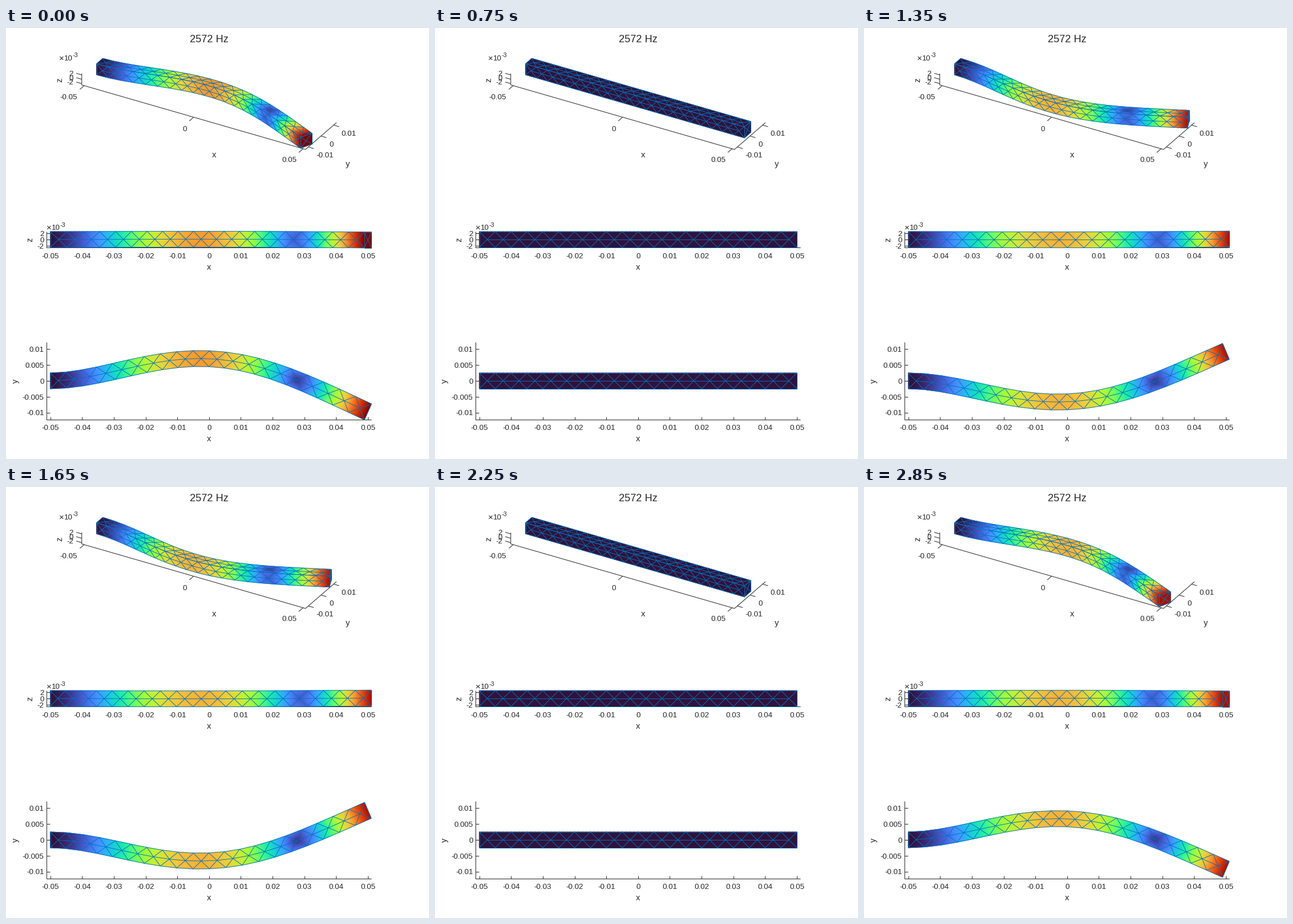
Recreate the animation shown at these times as a matplotlib script. Size 741 px wide and 756 px high, loop 3 s.

```python
import numpy as np
import matplotlib.pyplot as plt
from matplotlib.animation import FuncAnimation
from matplotlib.collections import LineCollection

W, H, DPI = 741, 756, 64
FRAMES, INTERVAL = 20, 150
PT = 72 / DPI                      # points per pixel

LENGTH, HALF, CELLS = 0.1, 0.0025, 20
AMP = 0.00977                      # tip deflection
XLIM, YLIM, ZLIM = 0.0511, 0.01225, 0.0026
INK, EDGE = "#262626", (0, 0.447, 0.741)

plt.rcParams["font.family"] = "Liberation Sans"
fig = plt.figure(figsize=(W / DPI, H / DPI), dpi=DPI, facecolor="white")
ax = fig.add_axes([0, 0, 1, 1])
ax.set_xlim(0, W)
ax.set_ylim(H, 0)
ax.axis("off")


# ---- projections: data (x, y, z) to pixels -------------------------------
class View:
    def __init__(self, origin, matrix):
        self.origin = np.array(origin)
        self.matrix = np.array(matrix)

    def __call__(self, pts):
        return self.origin + np.asarray(pts) @ self.matrix.T


def oblique(origin, scale, az, el):
    ca, sa, ce, se = np.cos(az), np.sin(az), np.cos(el), np.sin(el)
    return View(origin, scale * np.array([[ca, sa, 0],
                                          [sa * se, -ca * se, -ce]]))


S = 5565
iso = oblique((355.8, 123), 4428, np.pi / 6, np.pi / 6)
side = View((355.8, 371), [[S, 0, 0], [0, 0, -S]])
plan = View((355.8, 618.9), [[S, 0, 0], [0, -S, 0]])


# ---- beam surface mesh ---------------------------------------------------
def strip(place):
    """Long face: two edge rows and a staggered centre row of nodes."""
    n = CELLS
    xe = np.linspace(-LENGTH / 2, LENGTH / 2, n + 1)
    xc = (xe[:-1] + xe[1:]) / 2
    nodes = np.array([place(x, -HALF) for x in xe]
                     + [place(x, HALF) for x in xe]
                     + [place(x, 0) for x in xc])
    lo, hi, mid = 0, n + 1, 2 * n + 2
    tris = [(row + k, row + k + 1, mid + k) for row in (lo, hi) for k in range(n)]
    tris += [(mid + k, mid + k + 1, row + k + 1)
             for row in (lo, hi) for k in range(n - 1)]
    tris += [(lo, hi, mid), (lo + n, hi + n, mid + n - 1)]
    return nodes, np.array(tris)


def tip_face():
    x = LENGTH / 2
    ring = [(-HALF, -HALF), (HALF, -HALF), (HALF, HALF), (-HALF, HALF), (0, 0)]
    nodes = np.array([(x, y, z) for y, z in ring])
    return nodes, np.array([(k, (k + 1) % 4, 4) for k in range(4)])


front = strip(lambda x, t: (x, -HALF, t))
top = strip(lambda x, t: (x, t, HALF))
tip = tip_face()


def unique_edges(tris):
    pairs = np.vstack([tris[:, [0, 1]], tris[:, [1, 2]], tris[:, [2, 0]]])
    return np.unique(np.sort(pairs, axis=1), axis=0)


def subdivision(n):
    """Barycentric weights and small triangles inside one triangle."""
    keys = [(i, j) for i in range(n + 1) for j in range(n + 1 - i)]
    index = {key: k for k, key in enumerate(keys)}
    weights = np.array([(i, j, n - i - j) for i, j in keys]) / n
    small = []
    for i, j in keys:
        if i + j < n:
            small.append((index[i, j], index[i + 1, j], index[i, j + 1]))
        if i + j < n - 1:
            small.append((index[i + 1, j], index[i + 1, j + 1], index[i, j + 1]))
    return weights, np.array(small)


WEIGHTS, SMALL = subdivision(4)


# ---- second bending mode of a cantilever ---------------------------------
BETA = 4.694091
SIGMA = (np.sinh(BETA) - np.sin(BETA)) / (np.cosh(BETA) + np.cos(BETA))


def shape(s):
    b = BETA * s
    return np.cosh(b) - np.cos(b) - SIGMA * (np.sinh(b) - np.sin(b))


def slope(s):
    b = BETA * s
    return BETA * (np.sinh(b) + np.sin(b) - SIGMA * (np.cosh(b) - np.cos(b)))


def displacement(nodes):
    s = nodes[:, 0] / LENGTH + 0.5
    w = -AMP * shape(s) / shape(1)
    turn = -0.95 * AMP / LENGTH * slope(s) / shape(1)
    return np.column_stack([-nodes[:, 1] * turn, w, 0.015 * w])


VMAX = np.linalg.norm(displacement(tip[0]), axis=1).max()

# ---- static axes and text ------------------------------------------------


def line(*pts):
    x, y = zip(*pts)
    ax.plot(x, y, color=INK, lw=PT, zorder=1, solid_capstyle="butt")


def label(x, y, s, ha="center", size=13.33):
    ax.text(x, y + 0.345 * size, s, ha=ha, va="baseline",
            fontsize=size * PT, color=INK, zorder=5)


def name(x, y, s, rotation=0):
    ax.text(x, y, s, ha="center", va="center", rotation=rotation,
            fontsize=14.67 * PT, color=INK, zorder=5)


def exponent(x, y):
    label(x, y, "×", "left", 15)
    label(x + 9, y, "10", "left")
    label(x + 24, y - 4.5, "-3", "left", 10.7)


def tick(view, base, step, length):
    p = view(base)
    d = view.matrix @ np.array(step, float)
    line(p, p + d / np.hypot(*d) * length)


def flat_axes(view, low, bottom, ticks, up):
    """Axes with inward ticks; `up` places a value on the vertical axis."""
    x0, x1 = view([-XLIM, 0, 0])[0], view([XLIM, 0, 0])[0]
    y0, y1 = view(up(-low))[1], view(up(low))[1]
    line((x0, y1), (x0, y0), (x1, y0))
    for k in range(-5, 6):
        x = view([k / 100, 0, 0])[0]
        line((x, y0), (x, y0 - 5.5))
        label(x, bottom, f"{k / 100:g}")
    for value, text in ticks:
        y = view(up(value))[1]
        line((x0, y), (x0 + 5.5, y))
        label(66.5, y + 0.3, text, "right")
    name(356, bottom + 20, "x")


Z_TICKS = [(0.002, "2"), (0, "0"), (-0.002, "-2")]
flat_axes(side, ZLIM, 399.5, Z_TICKS, lambda v: [0, 0, v])
flat_axes(plan, YLIM, 700.8,
          [(v, f"{v:g}") for v in (0.01, 0.005, 0, -0.005, -0.01)],
          lambda v: [0, v, 0])
name(42.5, 371, "z", 90)
name(17, 619, "y", 90)
exponent(71, 349.5)

line(*iso([(-XLIM, -YLIM, ZLIM), (-XLIM, -YLIM, -ZLIM),
           (XLIM, -YLIM, -ZLIM), (XLIM, YLIM, -ZLIM)]))
for v, x, y in [(-0.05, 109.5, 120.5), (0, 313, 176), (0.05, 496, 230.5)]:
    tick(iso, (v, -YLIM, -ZLIM), (0, -1, 0), 10)
    label(x, y, f"{v:g}")
for v, x, y in [(0.01, 601, 184), (0, 570, 203), (-0.01, 559, 222.5)]:
    tick(iso, (XLIM, v, -ZLIM), (1, 0, 0), 10)
    label(x, y, f"{v:g}")
for v, text in Z_TICKS:
    base = (-XLIM, -YLIM, v)
    tick(iso, base, (-1, 0, 0), 10)
    label(118, iso(base)[1] - 3, text, "right")
name(364.5, 223, "x")
name(599, 239, "y")
name(94, 91, "z", 90)
exponent(93, 52)
label(355.5, 18.5, "2572 Hz", size=18.2)

# ---- animated beam -------------------------------------------------------
wires = LineCollection([], colors=[EDGE], linewidths=0.95 * PT, zorder=4)
ax.add_collection(wires)
surfaces = []


def faces_camera(p):
    a, b = p[1] - p[0], p[3] - p[0]
    return a[0] * b[1] - a[1] * b[0] < -1


def paint(p, value, tris):
    fine = np.einsum("wk,tkd->twd", WEIGHTS, p[tris]).reshape(-1, 2)
    shade = (value[tris] @ WEIGHTS.T).ravel()
    offsets = np.arange(len(tris))[:, None, None] * len(WEIGHTS)
    small = (SMALL[None] + offsets).reshape(-1, 3)
    surfaces.append(ax.tripcolor(fine[:, 0], fine[:, 1], shade, triangles=small,
                                 shading="gouraud", cmap="turbo",
                                 vmin=0, vmax=VMAX, zorder=3))


def update(i):
    while surfaces:
        surfaces.pop().remove()
    swing = np.cos(2 * np.pi * i / FRAMES)
    segments = []
    for view, faces in ((iso, (front, top, tip)), (side, (front, tip)),
                        (plan, (top,))):
        for face in faces:
            nodes, tris = face
            u = swing * displacement(nodes)
            p = view(nodes + u)
            if face is tip and not faces_camera(p):
                continue
            paint(p, np.linalg.norm(u, axis=1), tris)
            segments.extend(p[unique_edges(tris)])
    wires.set_segments(segments)
    return surfaces + [wires]


anim = FuncAnimation(fig, update, frames=FRAMES, interval=INTERVAL,
                     init_func=lambda: [wires], repeat=True, repeat_delay=0, blit=False)
plt.show()
```
